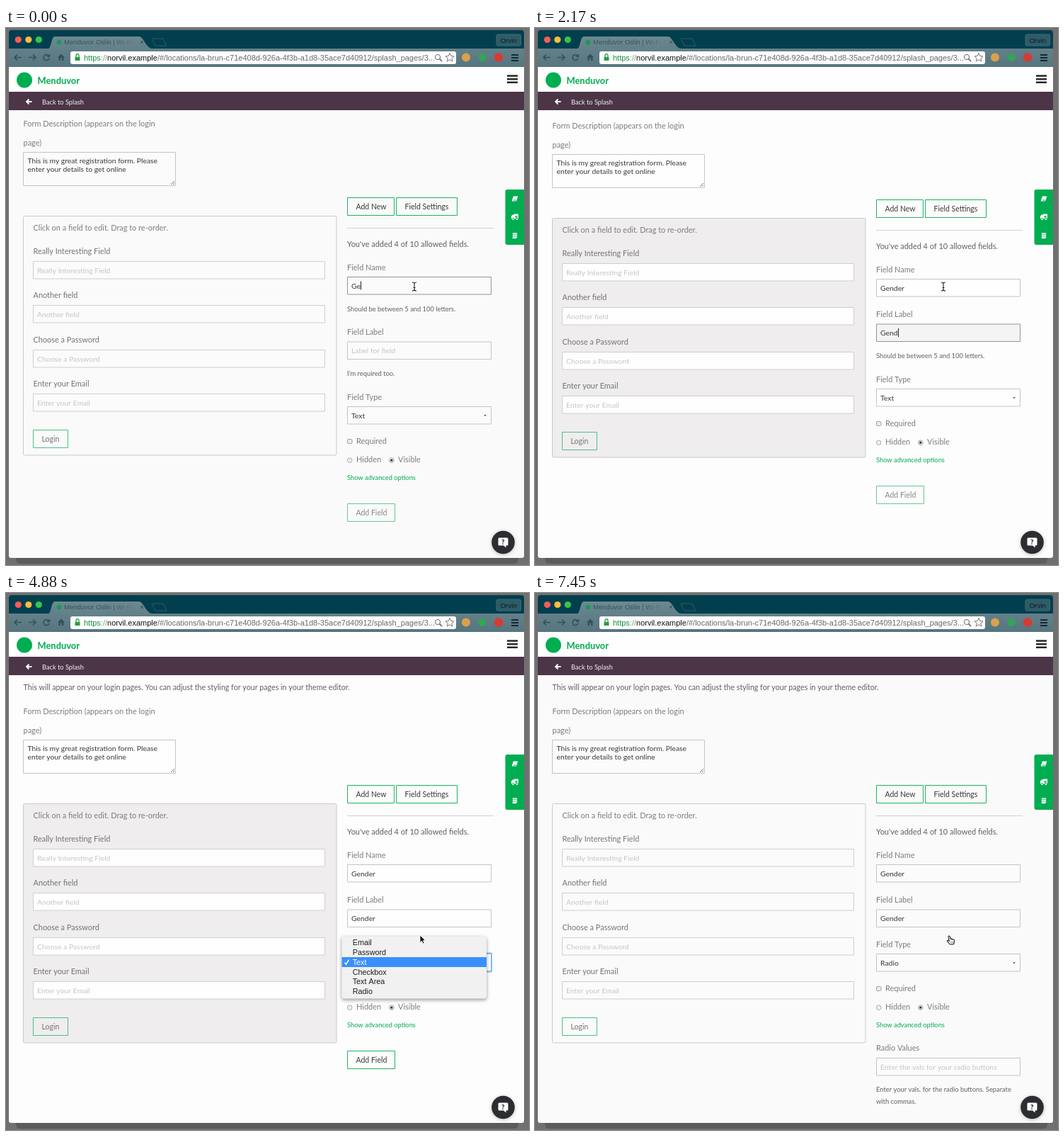
Write an HTML page with a canvas that moves like this. It is 739 by 758 pixels and loops after 8 s.

```html
<!DOCTYPE html>
<html lang="en">
<head>
<meta charset="utf-8">
<title>Form builder</title>
<style>
  html, body { margin: 0; width: 100%; height: 100%; overflow: hidden; background: #707070; }
  canvas { display: block; }
</style>
</head>
<body>
<canvas id="stage" width="739" height="758"></canvas>
<script>
const ctx = document.getElementById('stage').getContext('2d');
const LOOP = 8000;
const GREEN = '#00ad51', MUTED = '#7d7d7d', DARK = '#383838', PALE = '#c6c6c6';
const LATO = 'Lato, sans-serif', ARIAL = '"Liberation Sans", Arial, sans-serif';
const TYPES = ['Email', 'Password', 'Text', 'Checkbox', 'Text Area', 'Radio'];

// Last value whose start time has passed.
const pick = (t, steps) => steps.filter(([start]) => t >= start).pop()[1];

// y is the middle of the capitals.
function text(str, x, y, color = MUTED, size = 10.95, font = LATO, weight = 400) {
  ctx.font = `${weight} ${size}px ${font}`;
  ctx.fillStyle = color;
  ctx.fillText(str, x, y + size * 0.36);
  return x + ctx.measureText(str).width;
}

function box(x, y, w, h, fill, stroke, radius = 0, lineWidth = 1) {
  ctx.beginPath();
  ctx.roundRect(x, y, w, h, radius);
  if (fill) { ctx.fillStyle = fill; ctx.fill(); }
  if (stroke) { ctx.strokeStyle = stroke; ctx.lineWidth = lineWidth; ctx.stroke(); }
}

function circle(x, y, r, fill, stroke) {
  ctx.beginPath();
  ctx.arc(x, y, r, 0, 7);
  if (fill) { ctx.fillStyle = fill; ctx.fill(); }
  if (stroke) { ctx.strokeStyle = stroke; ctx.lineWidth = 1; ctx.stroke(); }
}

function path(d, x, y, stroke, fill, lineWidth = 1) {
  const shape = new Path2D(d);
  ctx.save();
  ctx.translate(x, y);
  if (fill) { ctx.fillStyle = fill; ctx.fill(shape); }
  if (stroke) { ctx.strokeStyle = stroke; ctx.lineWidth = lineWidth; ctx.stroke(shape); }
  ctx.restore();
}

function bars(x, y, w, gap, thick, color) {
  ctx.fillStyle = color;
  for (let i = 0; i < 3; i++) ctx.fillRect(x, y + i * gap, w, thick);
}

function gradient(x0, y0, x1, y1, from, to) {
  const g = ctx.createLinearGradient(x0, y0, x1, y1);
  g.addColorStop(0, from);
  g.addColorStop(1, to);
  return g;
}

function stateAt(t) {
  const name = 'Gender'.slice(0, pick(t, [[0, 2], [140, 3], [300, 4], [460, 5], [620, 6]]));
  const label = 'Gender'.slice(0, pick(t, [[0, 0], [1420, 1], [1720, 2], [1870, 3], [2020, 4], [2180, 5], [2330, 6]]));
  const nameHelp = name.length < 5, labelHelp = label.length < 5;
  return {
    name, label, nameHelp, labelHelp,
    shift: nameHelp ? 0 : labelHelp ? 3 : 32,
    focus: pick(t, [[0, 'name'], [780, 'label'], [2490, 'type'], [7450, '']]),
    scrollbar: pick(t, [[0, 0], [460, 1], [950, 0.5], [1120, 0], [2180, 1], [2940, 0.5], [3090, 0]]),
    tinted: t >= 460 && t < 5330,
    radio: t >= 6700,
    menu: pick(t, [[0, 0], [3840, 1], [6530, 0.5], [6700, 0]]),
    active: pick(t, [[0, 2], [4580, 1], [4880, 2], [5030, 3], [5180, 4], [5330, 5]]),
    cursor: pick(t, [
      [0, ['beam', 577, 365]], [2490, ['hand', 577, 365]], [3540, ['hand', 580, 410]],
      [3690, ['hand', 585.5, 484]], [3990, ['arrow', 585, 483]], [6700, ['hand', 585.5, 484]],
    ]),
  };
}

function drawBrowser() {
  ctx.fillStyle = '#707070';
  ctx.fillRect(0, 0, 739, 758);
  box(14, 740, 710, 16, '#5c5c5c', null, 6);
  box(4, 3, 728, 745, '#023f4e', null, 4);
  ['#fc5b57', '#fdbd3e', '#33c748'].forEach((c, i) => circle(17.3 + i * 14.5, 16.5, 4.6, c));

  const bar = gradient(0, 12, 0, 55, '#6d8891', '#55757f');
  const ink = '#34515a';
  path('M60 29 C64 28 64 12 69 12 H188 C194 12 198 28 206 29 Z', 0, 0, null, bar);
  path('M206 15 H222 L227 25 H211 Z', 0, 0, '#2f5b68');
  circle(75, 20, 3.5, '#189a56');
  text('Menduvor Oslin | Wi-Fi On', 82, 20, gradient(150, 0, 187, 0, ink, '#34515a00'), 9.5, ARIAL);
  path('M-2 -2 L2 2 M2 -2 L-2 2', 192, 20, ink);
  box(693, 9, 34.5, 16, '#2f5b68', '#3f6a76', 2);
  text('Orvin', 698.5, 17, '#0c1c22', 9.8, ARIAL);

  ctx.fillStyle = bar;
  ctx.fillRect(4, 29, 728, 26);
  path('M5 0 H-5 M-1 -4 L-5 0 L-1 4', 17, 41.5, ink, null, 1.7);
  path('M-5 0 H5 M1 -4 L5 0 L1 4', 37, 41.5, ink, null, 1.7);
  path('M3.5 -2 A4 4 0 1 0 4 1 M4.5 -4.5 V-1.2 H1', 57, 41.5, ink, null, 1.6);
  path('M-5 0 L0 -5 L5 0 H3.5 V4.5 H1 V1 H-1 V4.5 H-3.5 V0 Z', 78, 41.5, null, ink);
  box(91, 33, 545, 18, '#fdfdfd', null, 3);
  path('M-2 0 V-2 A2 2.3 0 0 1 2 -2 V0', 101, 41, '#2b9b49', null, 1.3);
  box(97.5, 41, 7, 5, '#2b9b49');
  let x = 110;
  for (const [part, color] of [
    ['https', '#14913a'], ['://', '#7f9a87'], ['norvil.example', '#151515'],
    ['/#/locations/la-brun-c71e408d-926a-4f3b-a1d8-35ace7d40912/splash_pages/3...', '#6b6b6b'],
  ]) x = text(part, x, 42, color, 11, ARIAL);
  circle(610, 41, 3.6, null, '#666');
  path('M2.6 2.6 L6 6', 610, 41, '#666', null, 1.7);
  path('M0 -6 L1.8 -2 L6 -1.6 L2.8 1.3 L3.8 5.5 L0 3.2 L-3.8 5.5 L-2.8 1.3 L-6 -1.6 L-1.8 -2 Z', 627, 41.5, '#777');
  circle(650, 41.5, 6, '#dda04a');
  circle(673, 41.5, 5.5, '#32a556');
  circle(696, 41.5, 6.2, '#d83a34');
  bars(714, 37, 10, 4, 2, '#132a32');
}

function drawHeader() {
  ctx.fillStyle = '#fefefe';
  ctx.fillRect(4, 55, 728, 35);
  circle(26, 73.5, 11, GREEN);
  text('Menduvor', 44.5, 74, GREEN, 12.9, LATO, 700);
  bars(708, 66.3, 15, 4.6, 2.5, '#262626');
  ctx.fillStyle = '#4b3547';
  ctx.fillRect(4, 90, 728, 26);
  path('M4 0 H-3 M0 -3.5 L-3.5 0 L0 3.5', 32.5, 104, '#fff', null, 1.8);
  text('Back to Splash', 51, 104.3, '#f4f0f3', 9.25);
}

function button(label, x, y, w, color = DARK, border = '#1fb264') {
  box(x + 0.5, y - 12.5, w - 1, 25, null, border);
  text(label, x + 12.5, y, color, 10.5);
}

function field(value, hint, x, y, w, opts = {}) {
  box(x + 0.5, y - 12, w - 1, 24.5, opts.fill, opts.border || '#cfcfcf');
  const end = value ? text(value, x + 6, y + 0.3, DARK, 10.4) : x + 6;
  if (!value && hint) text(hint, x + 6, y + 0.3, PALE, 10.4);
  if (opts.caret) { ctx.fillStyle = '#222'; ctx.fillRect(Math.round(end), y - 6, 1, 12); }
}

function drawLeft(s, fill) {
  text('This will appear on your login pages. You can adjust the styling for your pages in your theme editor.', 24.5, 101.3, '#606060', 10.68);
  text('Form Description (appears on the login', 24.5, 134.7);
  text('page)', 24.5, 161.7);
  box(24.5, 175.5, 215, 47, fill, '#c4c4c4');
  text('This is my great registration form. Please', 30.5, 187, DARK, 10.35);
  text('enter your details to get online', 30.5, 199.5, DARK, 10.35);
  path('M-5 0 L0 -5 M-2 0 L0 -2', 238, 221, '#777');

  box(24.5, 265.5, 442.5, 337.5, s.tinted ? '#efedee' : null, '#c9c9c9', 2);
  text('Click on a field to edit. Drag to re-order.', 38.5, 281.7);
  ['Really Interesting Field', 'Another field', 'Choose a Password', 'Enter your Email'].forEach((label, i) => {
    const y = Math.round(341 + i * 62.4) + 0.5;
    text(label, 38.5, y - 26, '#747474');
    field('', label, 38, y, 413, { fill });
  });
  button('Login', 38, 580, 50, '#747474', '#4cc183');
}

function drawRight(s, fill) {
  button('Add New', 482, 252, 67);
  button('Field Settings', 551, 252, 87);
  ctx.fillStyle = '#d2d2d2';
  ctx.fillRect(482, 282, 207, 1);
  text("You've added 4 of 10 allowed fields.", 482, 304.7, '#606060');

  const border = '#c4c4c4';
  const inputStyle = key => {
    const on = s.focus === key;
    return { fill: on && s.tinted ? '#f5f4f5' : fill, border: on ? '#959595' : border, caret: on };
  };
  text('Field Name', 482, 337.7);
  field(s.name, '', 482, 363.5, 204, inputStyle('name'));
  if (s.nameHelp) text('Should be between 5 and 100 letters.', 482, 396.2, '#606060', 9.35);

  let y = s.nameHelp ? 455 : 427;
  text('Field Label', 482, y - 25.6);
  field(s.label, 'Label for field', 482, y, 204, inputStyle('label'));
  if (s.labelHelp) {
    text(s.label ? 'Should be between 5 and 100 letters.' : "I'm required too.", 482, y + 33, '#606060', 9.35);
  }

  y += s.labelHelp ? 91.5 : 62.5;
  text('Field Type', 482, y - 25.8);
  field(s.radio ? 'Radio' : 'Text', '', 482, y, 204, { fill, border });
  path('M-1.7 -0.8 H1.7 L0 1.3 Z', 677, y + 0.5, null, '#333');
  if (s.focus === 'type') box(481.5, y - 13, 204.5, 26, null, '#81b6f1', 1, 2);

  box(482.5, y + 34, 6.5, 6, '#ececec', '#a0a0a0', 1.5);
  text('Required', 495, y + 36.2);
  circle(485.7, y + 63.7, 3.3, '#f0f0f0', '#a8a8a8');
  text('Hidden', 495, y + 63);
  circle(544.8, y + 63.7, 3.3, '#f0f0f0', '#a0a0a0');
  circle(544.8, y + 63.7, 1.6, '#333');
  text('Visible', 554, y + 63);
  text('Show advanced options', 482, y + 88, GREEN, 9.3);

  if (s.radio) {
    text('Radio Values', 482, y + 121);
    field('', 'Enter the vals for your radio buttons', 482, y + 147, 204, { fill, border });
    text('Enter your vals. for the radio buttons. Separate', 482, y + 179.3, '#606060', 9.35);
    text('with commas.', 482, y + 196.5, '#606060', 9.35);
  } else if (s.labelHelp) {
    button('Add Field', 482, y + 137.5, 68, '#858585', '#66c893');
  } else {
    button('Add Field', 482, y + 137.5, 68);
  }
}

function drawOverlays(s) {
  if (s.scrollbar) {
    ctx.globalAlpha = s.scrollbar;
    box(725.5, 117, 4.5, 630, '#8c8c8c', null, 2);
    ctx.globalAlpha = 1;
  }
  box(705.5, 228, 26.5, 78, GREEN, null, [3, 0, 0, 3]);
  path('M-2.5 -4 H5 L2.5 4 H-5 Z M-2 2 H2', 719, 241, GREEN, '#fff');
  path('M-5 -1 L-3 -3 H-1 V-4 H5 V3 H-5 Z', 719, 266.5, null, '#fff');
  path('M0 0 H4 M2 -2 V2', 719, 266.5, GREEN);
  circle(716.5, 270, 1.6, '#fff', GREEN);
  circle(722, 270, 1.6, '#fff', GREEN);
  path('M-3.5 -4 H3.5 V2.5 L1.5 4.5 H-3.5 Z M-3.5 -1.5 H3.5 M-3.5 1 H3.5', 719, 293, GREEN, '#fff', 0.7);

  ctx.save();
  ctx.shadowColor = '#0004';
  ctx.shadowBlur = 5;
  ctx.shadowOffsetY = 1;
  circle(702.5, 726, 16.3, '#2c2d30');
  ctx.restore();
  path('M-5.5 -6 H5.5 Q7 -6 7 -4.5 V3.5 Q7 5 5.5 5 H4 V8 L0.5 5 H-5.5 Q-7 5 -7 3.5 V-4.5 Q-7 -6 -5.5 -6 Z', 702.5, 725.5, null, '#fff');
  text('?', 700, 725.2, '#2c2d30', 9.5, LATO, 900);
}

function drawMenu(s) {
  if (!s.menu) return;
  ctx.save();
  ctx.globalAlpha = s.menu;
  ctx.shadowColor = '#0006';
  ctx.shadowBlur = 5;
  ctx.shadowOffsetY = 2;
  box(474.5, 484.5, 204.5, 88, s.tinted ? '#f2f1f2' : '#fafafa', null, 4);
  ctx.shadowColor = 'transparent';
  TYPES.forEach((type, i) => {
    const y = 493.6 + i * 13.75;
    const on = i === s.active;
    if (on) { ctx.fillStyle = '#3a90fb'; ctx.fillRect(474.5, Math.round(y - 7), 204.5, 14); }
    const ink = on ? '#fff' : '#1c1c1c';
    text(type, 489.7, y, ink, 10.8, ARIAL);
    if (i === 2) path('M-3 0.5 L-1 3 L3 -3.5', 481.5, y, ink, null, 1.5);
  });
  ctx.restore();
}

function drawCursor([kind, x, y]) {
  if (kind === 'beam') {
    const d = 'M-3 -6 Q0 -6 0 -4 Q0 -6 3 -6 M0 -4 V4 M-3 6 Q0 6 0 4 Q0 6 3 6 M-1.5 1.5 H1.5';
    path(d, x, y, '#fff', null, 2.4);
    path(d, x, y, '#222', null, 1.1);
  } else if (kind === 'hand') {
    path('M-1.5 1 Q-0.5 -0.8 0.8 1 L1.5 4.3 Q2.7 3.3 3.5 4.7 Q5 4 5.5 5.3 Q7 5 7 7 Q7 9.5 5.8 12 H0.6 Q-0.8 9.5 -3 7.6 Q-3.3 6 -1.8 6.2 L-0.3 7.2 Z', x, y, '#222', '#fff', 1.1);
    path('M2 8 V10.5 M3.6 8 V10.5 M5.2 8 V10.5', x, y, '#555', null, 0.6);
  } else {
    path('M0 0 V10.5 L2.5 8.3 L4.2 12 L6 11.2 L4.4 7.6 H7.6 Z', x, y, '#fff', '#111', 0.8);
  }
}

function render(t) {
  const s = stateAt(t);
  const page = s.tinted ? '#fdfdfd' : '#fafafa';
  const inputFill = s.tinted ? '#fefefe' : '#fbfbfb';
  drawBrowser();
  ctx.save();
  ctx.beginPath();
  ctx.roundRect(4, 116, 728, 632, [0, 0, 3, 3]);
  ctx.clip();
  ctx.fillStyle = page;
  ctx.fillRect(4, 116, 728, 632);
  ctx.translate(0, s.shift);
  drawLeft(s, inputFill);
  drawRight(s, inputFill);
  ctx.restore();
  drawHeader();
  drawOverlays(s);
  drawMenu(s);
  drawCursor(s.cursor);
}

function tick() {
  render(performance.now() % LOOP);
  requestAnimationFrame(tick);
}
tick();
</script>
</body>
</html>
```
